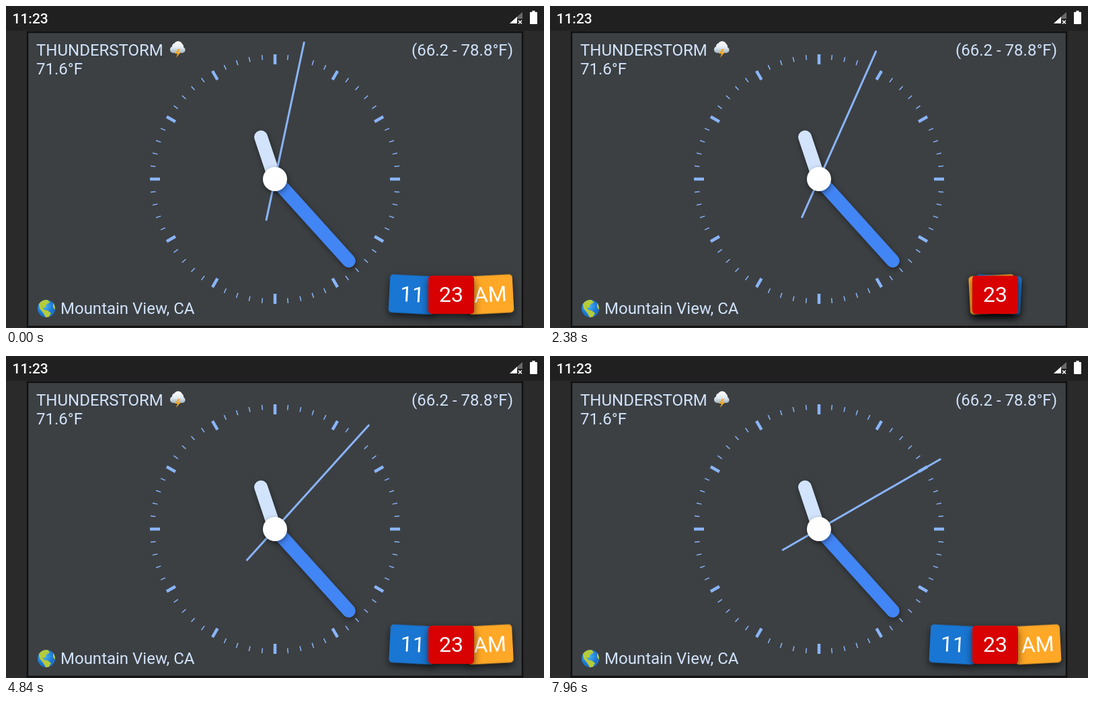
An HTML page that plays this animation: 800 px wide and 480 px high, repeating every 8000 ms.

```html
<!DOCTYPE html>
<html lang="en">
<head>
<meta charset="utf-8">
<title>Weather clock</title>
<style>
  html, body { margin: 0; width: 100%; height: 100%; overflow: hidden; background: #2a2a2a; }
  svg { display: block; width: 100vw; height: 100vh; font-family: Roboto, sans-serif; }
  .info { font-size: 24px; fill: #d2e3fc; }
  .card text { font-size: 32px; fill: #fff; text-anchor: middle; }
  .card rect { filter: drop-shadow(0 5px 6px rgba(0, 0, 0, .6)); }
  .hand { stroke-linecap: round; }
  .raised { filter: drop-shadow(1px 3px 4px rgba(0, 0, 0, .4)); }
</style>
</head>
<body>
<svg viewBox="0 0 800 480">
  <defs>
    <linearGradient id="cloud" x2="0" y2="1">
      <stop stop-color="#fff"/><stop offset=".55" stop-color="#e3eaf0"/><stop offset="1" stop-color="#9fb3c2"/>
    </linearGradient>
    <radialGradient id="sea" cx=".4" cy=".35">
      <stop stop-color="#4fb8f7"/><stop offset="1" stop-color="#1a73d0"/>
    </radialGradient>
    <clipPath id="globe"><circle cx="60" cy="451" r="13"/></clipPath>
  </defs>

  <rect width="800" height="480" fill="#2a2a2a"/>
  <rect width="800" height="37" fill="#202020"/>
  <rect x="32" y="39" width="736" height="439" fill="#3c4043" stroke="#101010" stroke-width="2.500"/>

  <!-- status bar -->
  <text x="9.5" y="26" font-size="21" font-weight="500" fill="#fff">11:23</text>
  <path d="M768 9V26H749Z" fill="#6a6a6a"/>
  <path d="M760 16V26H749Z" fill="#fff"/>
  <rect x="760" y="19" width="9" height="8" fill="#202020"/>
  <path d="M762 21.500l5 5m0-5l-5 5" stroke="#fff" stroke-width="1.500"/>
  <path d="M779 10q0-1 1-1h2.500v-2h4v2h2.500q1 0 1 1v16q0 1-1 1h-9q-1 0-1-1z" fill="#fff"/>

  <!-- weather and place -->
  <text class="info" x="45" y="74">THUNDERSTORM</text>
  <text class="info" x="45" y="102">71.6°F</text>
  <text class="info" x="754" y="74" text-anchor="end">(66.2 - 78.8°F)</text>
  <text class="info" x="81" y="459">Mountain View, CA</text>
  <path d="M248 70a5 5 0 0 1-1-9.500a5 5 0 0 1 3.500-5a6.500 6.500 0 0 1 11.500 1a5 5 0 0 1 2 5a4.500 4.500 0 0 1-1.500 8.500z" fill="url(#cloud)"/>
  <path d="M256 64l-5 7h4l-2 6l7-8h-4l3-5z" fill="#f9a825"/>
  <circle cx="60" cy="451" r="13" fill="url(#sea)"/>
  <g clip-path="url(#globe)" fill="#b5cc3a">
    <path d="M49 444l5-6l8 0l3 4l-5 3l-2 5l-4-1l3 4l5 1l5 4l-3 5l-4 5l-2-6l-3-5l-5-6z"/>
    <path d="M70 441l4 6l-1 6l-3-4z"/>
  </g>

  <!-- clock -->
  <g transform="translate(400 258)">
    <g id="ticks" stroke="#8ab4f8"></g>
    <g class="hand raised" stroke-width="20">
      <path d="M0 0V-164" stroke="#4285f4" transform="rotate(138)"/>
    </g>
    <g class="hand raised" stroke-width="20">
      <path d="M0 0V-66" stroke="#d2e3fc" transform="rotate(341.500)"/>
    </g>
    <path id="second" class="hand" d="M0 62V-208" stroke="#8ab4f8" stroke-width="3"/>
    <circle class="raised" r="18" fill="#fff"/>
  </g>

  <!-- time cards -->
  <g class="card" id="hours">
    <rect x="-34" y="-28.500" width="68" height="57" rx="5" fill="#1976d2"/><text y="11">11</text>
  </g>
  <g class="card" id="period">
    <rect x="-34" y="-28.500" width="68" height="57" rx="5" fill="#ffa726"/><text y="11">AM</text>
  </g>
  <g class="card" transform="translate(662 430.500)">
    <rect x="-34" y="-28.500" width="68" height="57" rx="5" fill="#d80000"/><text y="10.500">23</text>
  </g>
</svg>
<script>
const LOOP = 8000, CARD_PERIOD = 1006, CARD_REACH = 58;
const byId = id => document.getElementById(id);

byId('ticks').innerHTML = Array.from({ length: 60 }, (_, i) => {
  const major = i % 5 === 0;
  return `<path d="M0-186V${major ? -171 : -178.5}" stroke-width="${major ? 4.5 : 1.5}" transform="rotate(${i * 6})"/>`;
}).join('');

const bezier = (a, b, s) => 3 * (1 - s) ** 2 * s * a + 3 * (1 - s) * s * s * b + s ** 3;

// cubic-bezier(.68, -.55, .265, 1.55), solved by bisection
function easeInOutBack(u) {
  let low = 0, high = 1;
  for (let i = 0; i < 24; i++) {
    const mid = (low + high) / 2;
    if (bezier(.68, .265, mid) < u) low = mid; else high = mid;
  }
  return bezier(-.55, 1.55, low);
}

function placeCard(id, offset, tilt) {
  byId(id).setAttribute('transform', `translate(${662 + offset} 430) rotate(${tilt})`);
}

function draw() {
  const t = performance.now() % LOOP;
  const angle = 6 * (2 + Math.floor((t + 200) / 1000));
  byId('second').setAttribute('transform', `rotate(${angle})`);

  const open = Math.abs(1 - 2 * (t / CARD_PERIOD % 1));
  const offset = CARD_REACH * easeInOutBack(open);
  placeCard('hours', -offset, 3);
  placeCard('period', offset, -3);

  requestAnimationFrame(draw);
}
draw();
</script>
</body>
</html>
```
